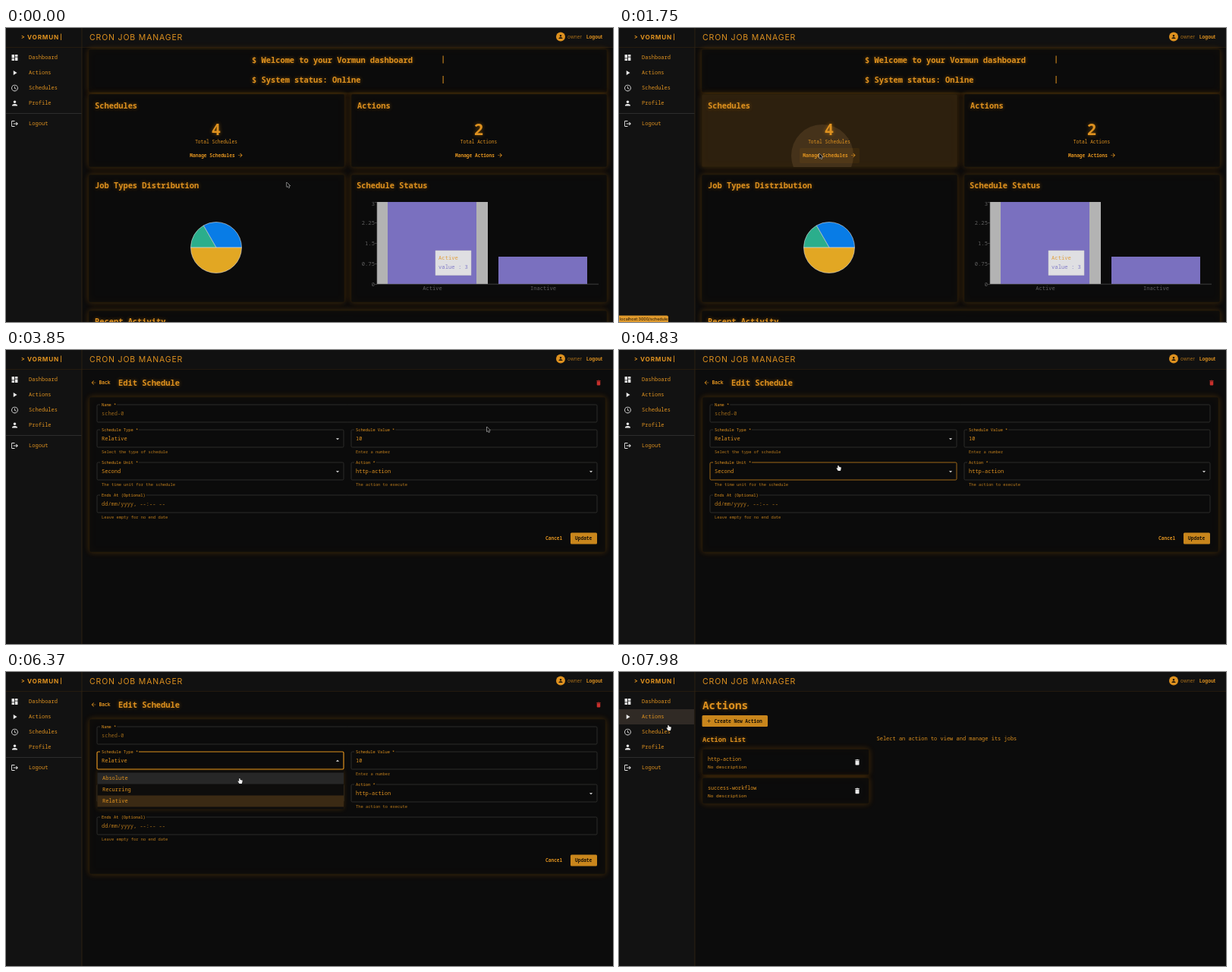
Animation of 800 by 387 pixels, one loop 8 s. Source, as an HTML page with a canvas:

```html
<!DOCTYPE html>
<html lang="en">
<head>
<meta charset="utf-8">
<title>Cron Job Manager</title>
<style>
  html, body { margin: 0; height: 100%; overflow: hidden; background: #0c0c0c; }
  canvas { display: block; width: 800px; height: 387px; }
</style>
</head>
<body>
<canvas id="stage"></canvas>
<script>
const canvas = document.getElementById('stage');
const ctx = canvas.getContext('2d');
const ratio = window.devicePixelRatio || 1;
canvas.width = 800 * ratio;
canvas.height = 387 * ratio;

const LOOP = 8000, STEP = 70;
const ORANGE = '#de911f', AMBER = '#c9861c', DIM = '#a86e1a', WHITE = '#e8e8e8', RED = '#c9302c';
const PAGE = '#0c0c0c', PANEL = '#121212', DARK = '#1a1207', BORDER = '#3b3a38', PURPLE = '#7a70bf';
const MONO = '"Noto Sans Mono", "DejaVu Sans Mono", monospace';
const SANS = 'Inter, Lato, sans-serif';

// Icons on a 24 unit grid
const ICONS = {
  dashboard: 'M3 13h8V3H3zM3 21h8v-6H3zM13 21h8V11h-8zM13 3v6h8V3z',
  play: 'M8 5v14l11-7z',
  clock: 'M12 2a10 10 0 1 0 0 20a10 10 0 1 0 0-20zm0 2a8 8 0 1 1 0 16a8 8 0 1 1 0-16zM11 7h1.8v5l4.4 2.7-.9 1.4L11 13z',
  person: 'M12 12c2.2 0 4-1.8 4-4s-1.8-4-4-4-4 1.8-4 4 1.8 4 4 4zm0 2c-2.7 0-8 1.3-8 4v2h16v-2c0-2.7-5.3-4-8-4z',
  logout: 'M17 7l-1.4 1.4 2.6 2.6H8v2h10.2l-2.6 2.6L17 17l5-5zM4 5h8V3H4c-1.1 0-2 .9-2 2v14c0 1.1.9 2 2 2h8v-2H4z',
  forward: 'M12 4l-1.4 1.4 5.6 5.6H4v2h12.2l-5.6 5.6L12 20l8-8z',
  back: 'M20 11H7.8l5.6-5.6L12 4l-8 8 8 8 1.4-1.4L7.8 13H20z',
  plus: 'M19 13h-6v6h-2v-6H5v-2h6V5h2v6h6z',
  info: 'M12 2a10 10 0 1 0 0 20a10 10 0 1 0 0-20zM11 7h2v2h-2zM11 11h2v6h-2z',
  edit: 'M3 17.25V21h3.75L17.8 9.94l-3.75-3.75zM20.7 7c.4-.4.4-1 0-1.4l-2.3-2.3c-.4-.4-1-.4-1.4 0l-1.8 1.8 3.7 3.7z',
  pause: 'M6 19h4V5H6zM14 5v14h4V5z',
  trash: 'M6 19c0 1.1.9 2 2 2h8c1.1 0 2-.9 2-2V7H6zM19 4h-3.5l-1-1h-5l-1 1H5v2h14z',
  down: 'M7 10l5 5 5-5z',
  up: 'M7 14l5-5 5 5z'
};
const ARROW = new Path2D('M0 0V17L4 13.5 7 20 10 18.7 7 12.5H12z');
const HAND = new Path2D('M0 0c-2 0-2 2-2 3v8l-2-2c-2-1-3 1-2 2l5 8h9l2-8V7c-1-2-3-1-3 0 0-2-3-3-3-1 0-2-2-2-2-1V3c0-1 0-3-2-3z');

// Pointer stops: time, x, y
const POINTER = [
  [0, 370, 203], [500, 370, 203], [1500, 264, 165], [1820, 264, 165], [2870, 635, 126],
  [3300, 675, 95], [3600, 675, 95], [4830, 289, 152], [5150, 289, 117], [5350, 289, 117],
  [5810, 343, 151], [6200, 343, 151], [7000, 41, 57], [7600, 41, 57], [7980, 65, 70]
];

function pointerAt(t) {
  const next = POINTER.findIndex(stop => stop[0] > t);
  if (next < 0) return POINTER[POINTER.length - 1].slice(1);
  const [t0, x0, y0] = POINTER[next - 1], [t1, x1, y1] = POINTER[next];
  const u = (t - t0) / (t1 - t0), e = u * u * (3 - 2 * u);
  return [x0 + (x1 - x0) * e, y0 + (y1 - y0) * e];
}

const inside = ([px, py], x, y, w, h) => px >= x && px < x + w && py >= y && py < y + h;

function rect(x, y, w, h, color) {
  ctx.fillStyle = color;
  ctx.fillRect(x, y, w, h);
}

function round(x, y, w, h, radius, fill, stroke, lineWidth = 0.7) {
  ctx.beginPath();
  ctx.roundRect(x, y, w, h, radius);
  if (fill) { ctx.fillStyle = fill; ctx.fill(); }
  if (stroke) { ctx.strokeStyle = stroke; ctx.lineWidth = lineWidth; ctx.stroke(); }
}

function circle(x, y, r, color) {
  ctx.fillStyle = color;
  ctx.beginPath();
  ctx.arc(x, y, r, 0, Math.PI * 2);
  ctx.fill();
}

// y is the middle of the capitals
function text(str, x, y, size = 7, { weight = 500, color = ORANGE, align = 'left', font = MONO, spacing = 0 } = {}) {
  ctx.font = `${weight} ${size}px ${font}`;
  ctx.letterSpacing = spacing + 'px';
  ctx.textAlign = align;
  ctx.fillStyle = color;
  ctx.fillText(str, x, y + size * 0.34);
}

function glowText(str, x, y, size = 10.4, align = 'left') {
  ctx.save();
  ctx.shadowColor = 'rgba(255,152,0,.45)';
  ctx.shadowBlur = 5 * ratio;
  text(str, x, y, size, { weight: 700, align });
  ctx.restore();
}

function icon(name, cx, cy, size, color) {
  ctx.save();
  ctx.translate(cx - size / 2, cy - size / 2);
  ctx.scale(size / 24, size / 24);
  ctx.fillStyle = color;
  ctx.fill(new Path2D(ICONS[name]), 'evenodd');
  ctx.restore();
}

function card(x, y, w, h, fill = '#0b0b0b') {
  ctx.save();
  ctx.shadowColor = 'rgba(255,152,0,.22)';
  ctx.shadowBlur = 8 * ratio;
  round(x, y, w, h, 2, fill, '#21170a');
  ctx.restore();
}

function button(label, x, y, w, h, plus) {
  round(x, y, w, h, 1.5, AMBER);
  if (plus) icon('plus', x + 9, y + h / 2, 8, DARK);
  text(label, plus ? x + 16 : x + 6, y + h / 2, 6.2, { weight: 600, color: DARK });
}

function drawShell(highlightActions) {
  rect(0, 0, 800, 387, PAGE);
  rect(0, 0, 800, 25, '#111111');
  rect(0, 25, 100, 362, PANEL);
  rect(0, 25, 800, 0.8, '#2a1f10');
  rect(99.5, 0, 0.9, 387, '#2f2312');
  text('>', 20, 12, 8, { weight: 600 });
  text('VORMUN', 28, 12, 8.2, { weight: 700, font: SANS, spacing: 0.8 });
  rect(72, 7.5, 0.9, 8.5, ORANGE);
  text('CRON JOB MANAGER', 110, 12, 10.5, { weight: 400, font: SANS, spacing: 0.85 });
  circle(731, 11.5, 6, ORANGE);
  icon('person', 731, 11.5, 7.5, DARK);
  text('owner', 740, 12, 6.4, { weight: 400, font: SANS, color: DIM });
  text('Logout', 765, 12, 6.2, { weight: 700, font: SANS });

  if (highlightActions) rect(0, 49, 99, 20, '#302a25');
  const items = [['dashboard', 'Dashboard', 39], ['play', 'Actions', 59], ['clock', 'Schedules', 79],
    ['person', 'Profile', 99], ['logout', 'Logout', 126]];
  for (const [name, label, y] of items) {
    icon(name, 11.5, y, 10.5, WHITE);
    text(label, 30, y, 7.05);
  }
  rect(0, 112, 99.5, 0.8, '#343434');
}

function summary(x, title, count, hovered) {
  const center = x + 168;
  card(x, 87, 337, 96, hovered ? '#2d200e' : undefined);
  return () => {
    glowText(title, x + 8, 102);
    glowText(count, center, 134, 20.7, 'center');
    text('Total ' + title, center, 149.5, 6.2, { align: 'center' });
    const label = 'Manage ' + title;
    text(label, center - 5, 168, 6.2, { weight: 600, align: 'center' });
    icon('forward', center - 5 + label.length * 1.86 + 7, 167.5, 8.5, ORANGE);
  };
}

function pieSlice(from, to, color) {
  ctx.beginPath();
  ctx.moveTo(277, 289);
  ctx.arc(277, 289, 33.5, -from * Math.PI / 180, -to * Math.PI / 180, true);
  ctx.closePath();
  ctx.fillStyle = color;
  ctx.fill();
  ctx.strokeStyle = '#d8d8d8';
  ctx.lineWidth = 0.6;
  ctx.stroke();
}

function drawChart() {
  const gray = '#5e5e5e';
  rect(489, 229, 146, 108, '#b3b3b3');
  rect(503, 229, 117, 108, PURPLE);
  rect(649, 301, 117, 36, PURPLE);
  rect(488.6, 229, 0.6, 108, gray);
  rect(489, 336.8, 292, 0.6, gray);
  ['0', '0.75', '1.5', '2.25', '3'].forEach((label, i) => {
    const y = 337 - 27 * i;
    rect(486, y, 3, 0.6, gray);
    text(label, 486, i === 4 ? 231.5 : y + 1, 7.2, { color: gray, align: 'right' });
  });
  text('Active', 562, 343, 7.1, { color: gray, align: 'center' });
  text('Inactive', 708, 343, 7.1, { color: gray, align: 'center' });
  round(566, 293, 47, 32.5, 0, '#dfdfe2', '#c6c6c6', 0.5);
  text('Active', 570, 303, 7.2, { color: '#e0a040' });
  text('value : 3', 570, 314.5, 7.2, { color: '#837dc8' });
}

function drawDashboard(t, pointer) {
  const onCard = inside(pointer, 109, 87, 337, 96);
  const onLink = inside(pointer, 238, 158, 79, 20);
  card(109, 28, 683, 57);
  glowText('$ Welcome to your Vormun dashboard', 324, 42);
  glowText('$ System status: Online', 324, 68.5);
  rect(575.6, 36.5, 1, 10, ORANGE);
  rect(575.6, 63, 1, 10, ORANGE);

  const schedules = summary(109, 'Schedules', '4', onCard);
  if (onLink) {
    ctx.save();
    ctx.beginPath();
    ctx.rect(109, 87, 337, 96);
    ctx.clip();
    circle(268, 168, Math.min(77, Math.max(0, (t - 1500) / 250 * 41)), '#45321a');
    round(238, 158, 79, 20, 2, 'rgba(255,152,0,.06)');
    ctx.restore();
  }
  schedules();
  summary(455, 'Actions', '2', inside(pointer, 455, 87, 337, 96))();

  card(109, 193, 337, 168);
  glowText('Job Types Distribution', 117, 207);
  pieSlice(0, 120, '#087ce6');
  pieSlice(120, 180, '#2bae8c');
  pieSlice(180, 360, '#e2a723');
  card(455, 193, 337, 168);
  glowText('Schedule Status', 462, 207);
  drawChart();
  card(109, 372, 683, 40);
  glowText('Recent Activity', 117, 386);

  if (onLink) {
    round(0, 378.5, 65, 9, [0, 2, 0, 0], '#e09a2c');
    text('localhost:3000/schedules', 1, 383, 5.4, { font: SANS, weight: 400, color: DARK });
  }
}

function drawSchedules() {
  const columns = [117, 210, 304, 374, 451, 555, 657];
  glowText('Schedules', 110, 43);
  button('Create Schedule', 711, 34.5, 79, 15.5, true);
  card(110, 61, 679.5, 128);
  ['Name', 'Type', 'Value', 'Unit', 'Status', 'Action ID', 'Actions'].forEach((label, i) =>
    text(label, columns[i], 72.5, 6.3, { weight: 700 }));
  ['sched-0', 'sched-4', 'sched-7', 'sched-9'].forEach((name, i) => {
    const y = 97 + 26.3 * i, active = i !== 1;
    rect(110, y - 13.7, 679.5, 0.7, '#454340');
    text(name, columns[0], y, 7);
    ['Relative', '10', 'second'].forEach((value, k) => text(value, columns[k + 1], y, 6.25));
    round(451, y - 5, active ? 31.5 : 35.5, 10.2, 5.1, active ? ORANGE : '#46413b');
    text(active ? 'Pending' : 'Inactive', 454.5, y, 5.9, { color: active ? DARK : '#988874' });
    text('1', columns[5], y, 6.25);
    icon('info', 663.5, y, 8.5, ORANGE);
    icon('edit', 676, y, 8.5, ORANGE);
    icon(active ? 'pause' : 'play', 688.6, y, 8.5, active ? ORANGE : '#3fa046');
    icon('trash', 701, y, 8.5, RED);
  });
  rect(110, 188.6, 679.5, 0.8, '#454340');
}

function field(x, y, w, label, value, { helper, arrow, hovered, focused, color = ORANGE } = {}) {
  round(x, y, w, 23, 1.5, null, focused || hovered ? ORANGE : BORDER, focused ? 1.2 : 0.7);
  rect(x + 4, y - 2, label.length * 3.2 + 3, 4, '#0b0b0b');
  text(label, x + 6, y, 5.35);
  text(value, x + 6, y + 12, 7, { color });
  if (helper) text(helper, x + 6, y + 29, 5.4, { color: '#b97a1c' });
  if (arrow) icon(arrow, x + w - 8, y + 12, 10, WHITE);
}

function drawEdit(t, pointer) {
  const menuOpen = t >= 5250 && t < 7250;
  const hover = (x, y) => !menuOpen && inside(pointer, x, y, 325, 23);
  card(110, 62, 680, 204);
  icon('back', 115.5, 43, 8.5, ORANGE);
  text('Back', 122.5, 43, 6.3, { weight: 600 });
  glowText('Edit Schedule', 148, 43);
  icon('trash', 781, 43, 9, RED);

  field(120, 72, 659, 'Name *', 'sched-0', { color: '#986619' });
  field(120, 105, 325, 'Schedule Type *', 'Relative', {
    helper: 'Select the type of schedule', arrow: menuOpen ? 'up' : 'down',
    hovered: hover(120, 105), focused: menuOpen });
  field(455, 105, 324, 'Schedule Value *', '10', { helper: 'Enter a number' });
  field(120, 148, 325, 'Schedule Unit *', 'Second', {
    helper: 'The time unit for the schedule', arrow: 'down', hovered: hover(120, 148) });
  field(455, 148, 324, 'Action *', 'http-action', { helper: 'The action to execute', arrow: 'down' });
  field(120, 191, 659, 'Ends At (Optional)', 'dd/mm/yyyy, --:-- --', { helper: 'Leave empty for no end date', color: '#b97a1c' });
  text('Cancel', 711, 248, 6.2, { weight: 600 });
  button('Update', 744, 240.5, 35, 15);

  const ripple = t - 7000;
  if (ripple > 0 && ripple < 400)
    circle(402, 192, Math.min(100, ripple / 140 * 57), `rgba(255,255,255,${0.085 * (1 - ripple / 400)})`);
  if (menuOpen) drawMenu(pointer);
}

function drawMenu(pointer) {
  ctx.save();
  ctx.shadowColor = 'rgba(255,152,0,.2)';
  ctx.shadowBlur = 6 * ratio;
  round(120.5, 129.5, 324.5, 51, 1.5, '#0e0d0c');
  ctx.restore();
  ['Absolute', 'Recurring', 'Relative'].forEach((label, i) => {
    const y = 132.5 + 15 * i;
    const hovered = inside(pointer, 120, y, 325, 15);
    if (i === 2) rect(120.5, y, 324.5, 15, '#3b2a14');
    else if (hovered) rect(120.5, y, 324.5, 15, '#272727');
    text(label, 127, y + 7.5, 7);
  });
}

function drawActions() {
  glowText('Actions', 110, 44, 14.3);
  button('Create New Action', 109.5, 57, 86.5, 15, true);
  glowText('Action List', 110, 89, 8.65);
  text('Select an action to view and manage its jobs', 339.5, 87.5, 7);
  ['http-action', 'success-workflow'].forEach((name, i) => {
    const y = 101.5 + 37.7 * i;
    card(110, y, 219.5, 34);
    text(name, 117, y + 13.5, 6.7);
    text('No description', 117, y + 23.5, 6.1);
    icon('trash', 314, y + 17.3, 10, WHITE);
  });
}

function drawPointer([x, y], hand) {
  ctx.save();
  ctx.translate(x, y);
  ctx.scale(0.37, 0.37);
  ctx.lineWidth = 2.4;
  ctx.lineJoin = 'round';
  ctx.strokeStyle = hand ? '#111' : '#eee';
  ctx.fillStyle = hand ? '#eee' : '#111';
  const shape = hand ? HAND : ARROW;
  ctx.stroke(shape);
  ctx.fill(shape);
  ctx.restore();
}

function draw(t) {
  const pointer = pointerAt(t);
  ctx.setTransform(ratio, 0, 0, ratio, 0, 0);
  const onActions = inside(pointer, 0, 49, 99, 20);
  drawShell(t >= 7650 || (t >= 7250 && onActions));
  let hand = false;
  if (t < 1960) {
    drawDashboard(t, pointer);
  } else if (t < 3500) {
    drawSchedules();
    hand = inside(pointer, 657, 90, 50, 95);
  } else if (t < 7650) {
    drawEdit(t, pointer);
    hand = inside(pointer, 120, 105, 325, 73) || (t >= 7250 && onActions);
  } else {
    drawActions();
    hand = true;
  }
  drawPointer(pointer, hand);
}

const start = performance.now();
function tick() {
  const t = (performance.now() - start) % LOOP;
  draw(Math.floor(t / STEP) * STEP);
  requestAnimationFrame(tick);
}
tick();
</script>
</body>
</html>
```
